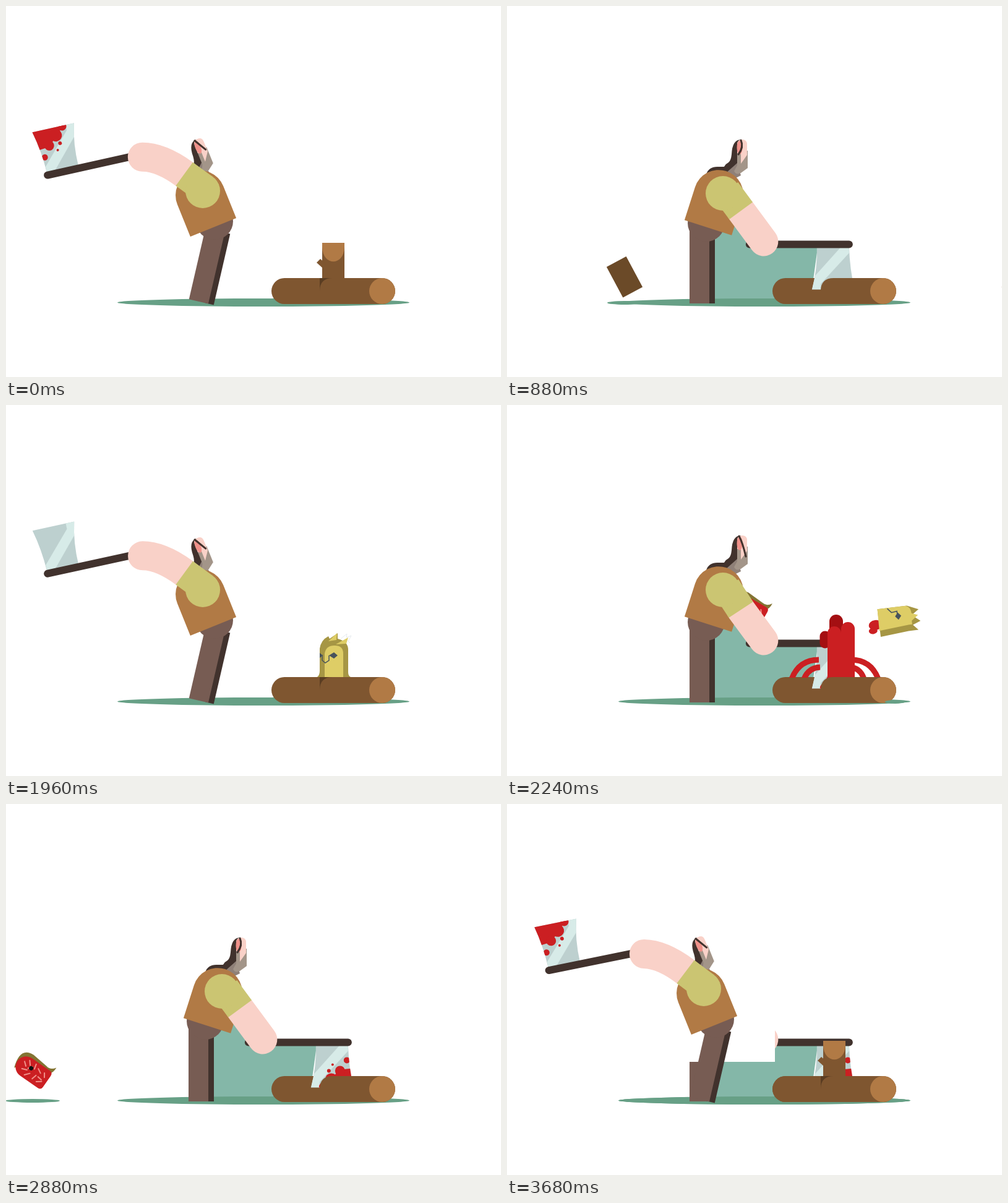
Animation of 800 by 600 pixels, one loop 3720 ms. Source, as an HTML page with a canvas:

```html
<!DOCTYPE html>
<html lang="en">
<head>
<meta charset="utf-8">
<title>Woodcutter</title>
<style>
  html, body { margin: 0; height: 100%; overflow: hidden; background: #fff; }
  canvas { display: block; }
</style>
</head>
<body>
<canvas id="stage" width="800" height="600"></canvas>
<script>
const ctx = document.getElementById('stage').getContext('2d');
const LOOP = 3720, HALF = LOOP / 2, STEP = 40;
const STRIKE = 280, LIFT = 1340;
const RAD = Math.PI / 180;
const C = {
  ground: '#67a086', teal: '#84b7a8', wood: '#7f5630', cut: '#b17a45', bark: '#6b4a28', slit: '#5a3d22',
  pants: '#775c53', dark: '#41322d', skin: '#f9d1c8', sleeve: '#cbc572', ear: '#f0918a',
  beard: '#a39589', neck: '#8f8078', blade: '#bdd0cf', shine: '#d7ebe8', red: '#cb1f22', gore: '#a40f12',
  yellow: '#decd66', olive: '#a69644', hood: '#837433', eye: '#48535c'
};

const clamp = x => Math.max(0, Math.min(1, x));
const mix = (a, b, k) => a + (b - a) * k;
const mixPoint = (a, b, k) => [mix(a[0], b[0], k), mix(a[1], b[1], k)];
const inOut = (x, n) => x < .5 ? (2 * x) ** n / 2 : 1 - (2 - 2 * x) ** n / 2;
const polar = ([x, y], r, deg) => [x + r * Math.cos(deg * RAD), y + r * Math.sin(deg * RAD)];

function fill(color, d) {
  ctx.fillStyle = color;
  ctx.fill(new Path2D(d));
}
function line(color, width, d, cap = 'butt') {
  ctx.strokeStyle = color;
  ctx.lineWidth = width;
  ctx.lineCap = cap;
  ctx.stroke(new Path2D(d));
}
function oval(color, x, y, rx, ry = rx) {
  ctx.fillStyle = color;
  ctx.beginPath();
  ctx.ellipse(x, y, rx, ry, 0, 0, 7);
  ctx.fill();
}
function at(x, y, deg, draw) {
  ctx.save();
  ctx.translate(x, y);
  ctx.rotate(deg * RAD);
  draw();
  ctx.restore();
}
function clipped(d, draw) {
  ctx.save();
  ctx.clip(new Path2D(d));
  draw();
  ctx.restore();
}

// Pose: lean and swing run from 0 (axe in the log) to 1 (wound up).
function pose(lean, swing, lag, jolt) {
  const [sx, sy] = mixPoint([349, 303], [318, 299], lean);
  const shoulder = [sx, sy - 4 * jolt];
  const hand = polar([sx, sy], mix(102, 112, swing) - .4 * lag, mix(49.8, -150.7, swing));
  const elbow = polar([sx, sy], 40.5, mix(44, -137.5, swing));
  const bend = mix(53.6, -144, swing);
  const angle = -192.5 * swing + lag;
  const reach = mix(138, 156, Math.sqrt(lean));
  const tip = polar(polar(hand, reach, angle), 4.5, angle + 90);
  return { lean, swing, jolt, shoulder, hand, elbow, bend, angle, tip };
}

function poseAt(c) {
  if (c < STRIKE) {
    const k = 1 - clamp((c - STRIKE + 240) / 240) ** 5;
    return pose(k, k, 0, 0);
  }
  if (c < LIFT) return pose(0, 0, 0, burst(c - STRIKE));
  const lean = inOut(clamp((c - LIFT) / 480), 3);
  const swing = inOut(clamp((c - LIFT - 10) / 560), 4);
  return pose(lean, swing, 88 * lean * (1 - lean), 0);
}

const burst = age => Math.sin(Math.PI * Math.sqrt(clamp(age / 400)));

function gap(q) {
  if (q.swing > .04) return;
  const [x, y] = q.tip;
  fill(C.teal, `M325 352L380 340L${q.hand}L${x - 50} ${y}L${x - 60} ${y + 73}L440 476H330Z`);
}

function head(q) {
  const [x, y] = mixPoint([372, 270], [322, 268], q.lean);
  at(x, y - 5 * q.jolt, -22 * q.lean, () => {
    fill(C.dark, 'M-50 2Q-46-10-32-10H-18V6Z');
    fill(C.dark, 'M-22 0Q-24-12-14-17Q-10-20-9-30Q-8-54 6-54V-20L-4 0Z');
    fill(C.neck, 'M-18 0L0-16L6 4L-2 8Z');
    fill(C.beard, 'M0-36H17V-8L6 0Q-2 4-5-3L0-12Z');
    fill(C.skin, 'M6-15L16-29V-46Q16-54 8-54Q0-54 0-46V-32H6Z');
    oval(C.ear, 4, -41, 4.5, 11);
    const k = Math.max(q.lean, q.jolt);
    const end = [mix(2, 14, k), -30 - 3 * q.lean + 10 * q.jolt];
    line(C.dark, 3, `M${mix(6, 3, k)}-53Q${mix(11, 9, k)}-42 ${end}`, 'round');
  });
}

function body(q) {
  head(q);
  at(325, 481, 13 * q.lean, () => {
    fill(C.dark, 'M-3 0V-118H11V0Z');
    fill(C.pants, 'M-30 0V-125H2V0Z');
  });
  oval(C.pants, ...mixPoint([322, 351], [337, 348], q.lean), 30);
  const [x, y] = mixPoint([325, 358.5], [335, 358], q.lean);
  at(x, y - 4 * q.jolt, mix(17.7, -22, q.lean),
    () => fill(C.cut, 'M-40 0V-56A40 40 0 0 1 40-56V0Z'));
}

function axe(q, bloody) {
  at(...q.tip, q.angle, () => {
    const blade = 'M-52 3H0Q1 40 9 73H-60Q-51 40-52 3Z';
    fill(C.blade, blade);
    clipped(blade, () => {
      fill(C.shine, 'M-12 3H0V14L-46 64V73H-60L-56 52Z');
      if (!bloody) return;
      fill(C.red, 'M12 75H-45L-27 58L-13 44L8 42Z');
      for (const [x, y, r] of [[-40, 72, 7], [-27, 60, 10], [-13, 46, 8], [-31, 46, 3], [-25, 36, 2], [-2, 29, 5]])
        oval(C.red, x, y, r);
    });
    line(C.dark, 12, 'M-161 0H0', 'round');
  });
}

function arm(q) {
  const bendPoint = polar(q.elbow, mix(31, 47, q.swing), q.bend);
  line(C.skin, 47, `M${q.elbow}Q${bendPoint} ${q.hand}`, 'round');
  const top = polar(q.elbow, -40, q.bend);
  line(C.sleeve, 47, `M${top[0]} ${top[1] - 4 * q.jolt}L${q.elbow}`);
  oval(C.sleeve, ...q.shoulder, 28);
}

function backLog() {
  fill(C.wood, 'M450 440H530V482H450A21 21 0 0 1 450 440Z');
  fill(C.slit, 'M507 440H528V461H507Z');
}
function frontLog() {
  fill(C.wood, 'M528 440H608A21 21 0 0 1 608 482H507V461Q507 440 528 440Z');
  oval(C.cut, 608, 461, 21);
}

function figure(q, bloody) {
  body(q);
  backLog();
  axe(q, bloody);
  arm(q);
}

// Blocks stand on their base at (0, 0).
function stump() {
  fill(C.wood, 'M-18 0V-57H18V0Z');
  fill(C.wood, 'M-17-16L-27-25L-21-31L-12-23Z');
  fill(C.cut, 'M-18-57H18V-50C17-19-17-19-18-50Z');
}
function bust() {
  fill(C.olive, 'M-26 0Q-22-3-22-10V-46Q-20-60-8-66L-6-62L7-71V-62Q24-58 24-44V-8Q24-2 28 0Z');
  fill(C.yellow, 'M-14 0V-38Q-12-51 2-51Q16-51 16-38V0Z');
  fill(C.yellow, 'M-8-58L6-71L5-60ZM4-53L24-64L21-54Z');
  line('#e5eaee', 1, 'M12-62L22-70L21-64L29-67L24-58L27-55');
  fill(C.eye, 'M-7-35L1-40L7-35L1-30ZM-22-39L-17-35L-22-31Z');
  line(C.eye, 1.5, 'M-18-36V-27L-13-23L-7-27V-35');
}
function severedHead() {
  oval(C.red, 4, 32, 8, 11);
  oval(C.red, 13, 37, 5, 7);
  fill(C.olive, 'M-21 26V-22L-13-40L-5-28L6-41L11-28L20-36V-20L24 26Z');
  fill(C.yellow, 'M-21 26V-20Q-18-28-8-28L-4-38L4-27H10V-22L14 27Z');
  fill(C.eye, 'M-12-6L-6-11L0-6L-6-1Z');
  line(C.eye, 1.5, 'M-20 10L-13 4L-14-5H-9');
}
function severedBack() {
  fill(C.hood, 'M-28 12Q-40-22-14-23L14-20Q22-18 28-27Q29-12 18-12L-10-10Z');
  fill(C.red, 'M-13-17H22Q28-17 28-11V11Q28 17 22 17H-13A17 17 0 0 1-13-17Z');
  line(C.ear, 2, 'M-20-6l6 5M-14-12l5 6M-17 6l8-3M-8 12l6-7M-2-13l2 8M5-9l7 4M6 10l2-8M14 10l7-5M17-9l4 6M-9 0l4-6M12 2l7 1', 'round');
  oval('#111', -5, -3, 3.5);
}

// One flight of 420 ms, then bounces on the ground.
function pieceHeight(age, launch) {
  const air = 420, base = 446;
  if (age < air) return 405 - launch * age + (base - 405 + launch * air) * (age / air) ** 2;
  return base - (age < 620 ? 25 : 14) * Math.abs(Math.sin(Math.PI * (age - air) / 200));
}

function piece(x, y, shadow, deg, draw) {
  oval(C.ground, x, 480, shadow * clamp((y - 300) / 130), 3);
  at(x, y, deg, draw);
}

function pieces(age, isBust) {
  const decay = (size, span) => size * (1 - Math.exp(-age / span));
  const low = pieceHeight(age, .778);
  if (isBust) return {
    drawLeft: () => piece(515 - decay(560, 400), pieceHeight(age, 1.01), 44, 30 - .555 * (age - 100), severedBack),
    drawRight: () => piece(524 + decay(363, 300), low, 44, 23 + .6 * age, severedHead)
  };
  return {
    drawLeft: () => piece(520 - .55 * age, low, 28, -.347 * age, () => fill(C.bark, 'M-18-28H18V28H-18Z')),
    drawRight: () => piece(529 + decay(348, 300), low, 28, .35 * age, () => { ctx.translate(0, 28); stump(); })
  };
}

function fountain(age) {
  const h = burst(age);
  if (h <= 0) return;
  clipped('M0 0H800V441H0Z', () => {
    ctx.translate(0, 105 * (1 - h));
    line(C.red, 9, 'M460 443Q472 412 504 412M480 443Q487 425 506 424M600 443Q588 412 556 412M577 443Q571 425 554 424');
    line(C.gore, 22, 'M532 550V350', 'round');
    line(C.gore, 17, 'M514 385V374', 'round');
    line(C.red, 22, 'M529 550V369M551 550V362', 'round');
  });
}

function render(t) {
  const second = t >= HALF, c = t % HALF, age = c - STRIKE;
  const q = poseAt(c);
  const bloody = second ? age >= 0 : age < 0;
  const flying = age >= 0 && age < (second ? 900 : 1030) && pieces(age, second);

  ctx.clearRect(0, 0, 800, 600);
  gap(q);
  oval(C.ground, 416, 479.5, 236, 6.5);

  // The axe stroke leaves a trace behind while it is raised the second time.
  if (second && c >= LIFT && q.swing > .04) {
    clipped('M433 340H800V600H0V417H433Z', () => {
      const rest = pose(0, 0, 0, 0);
      gap(rest);
      oval(C.ground, 416, 479.5, 236, 6.5);
      figure(rest, true);
    });
  }

  if (flying) flying.drawLeft();
  figure(q, bloody);

  const rise = age < 0 ? 1 : 1 - (1 - clamp((c - 1600) / 160)) ** 3;
  const bustNext = age < 0 ? second : !second;
  if (rise > 0) {
    clipped('M0 0H800V441H0Z', () =>
      at(529, 440 + 74 * (1 - rise), 0, bustNext ? bust : stump));
  }
  if (second && age >= 0) fountain(age);
  frontLog();
  if (flying) flying.drawRight();
}

function tick() {
  const t = performance.now() % LOOP;
  render(Math.floor(t / STEP) * STEP);
  requestAnimationFrame(tick);
}
tick();
</script>
</body>
</html>
```
